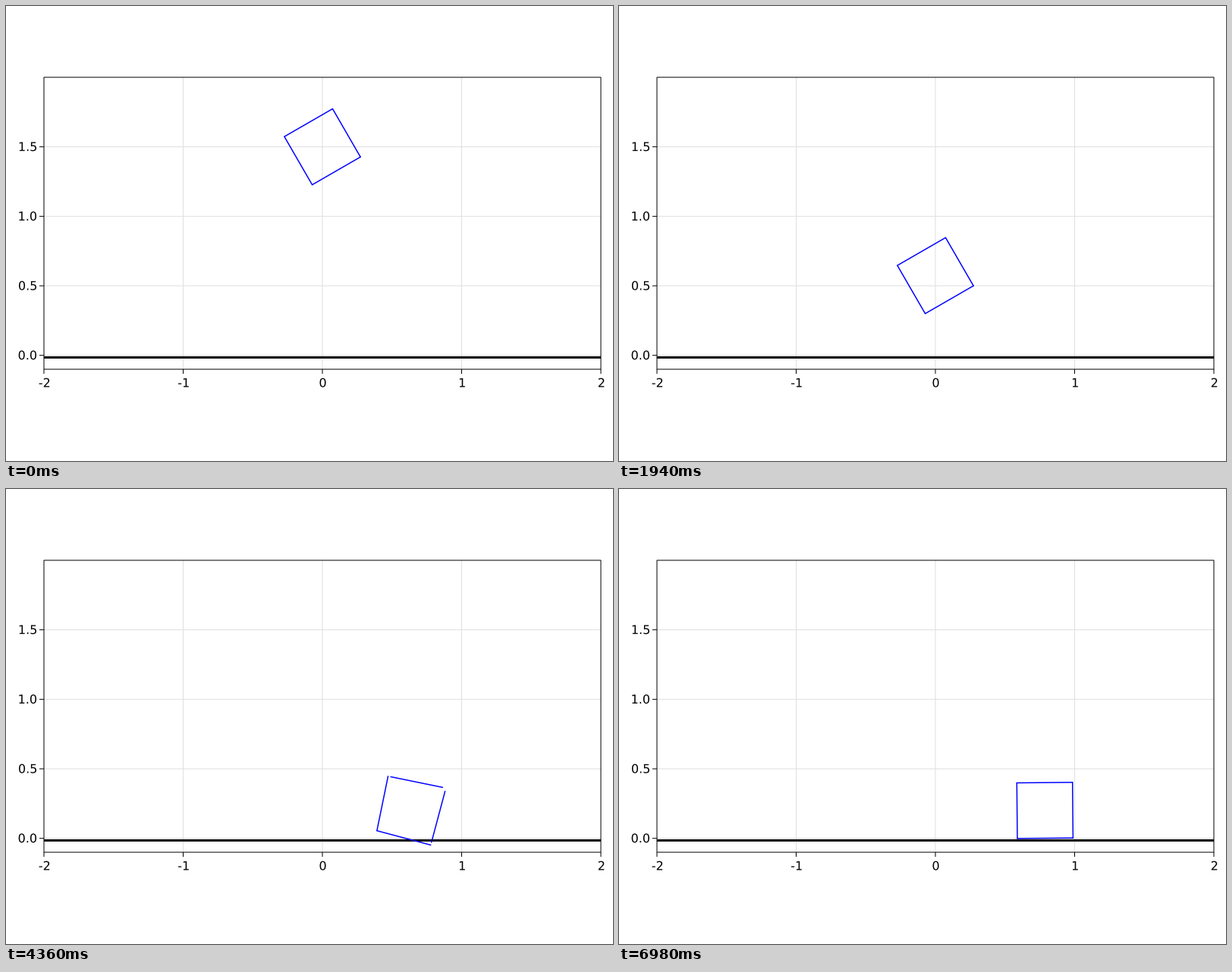
Write a matplotlib script that moves like this. It is 800 px wide and 600 px high and loops after 7080 ms.

```python
import numpy as np
import matplotlib.pyplot as plt
from matplotlib.animation import FuncAnimation
from matplotlib.collections import LineCollection
from matplotlib.patches import PathPatch, Rectangle
from matplotlib.textpath import TextPath
from matplotlib.transforms import Affine2D

W, H, DPI = 800, 600, 100
TICK, LOOP, STEPS = 20, 7080, 150
X0, X1, Y0, Y1 = 50, 784, 94, 479   # axis frame in pixels
G = 9.81e-4                         # gravity in m per step squared
SIDE = 0.4
HIT1, HIT2, LAND, TIP = 48, 94, 104, 108
BOUNCE = 0.45
CORNERS = SIDE / np.sqrt(2) * np.exp(1j * np.radians([135, 45, -45, -135]))

plt.rcParams["path.snap"] = False


def px(x, y):
    return X0 + (X1 - X0) * (x + 2) / 4, Y1 - (Y1 - Y0) * (y + 0.1) / 2.1


def pt(pixels):
    return pixels * 72 / DPI


def tipping():
    """Tilt of the box as it rocks down onto its base, one value per step."""
    tilt, speed, sub = 18.9, 0.0, 50
    out = []
    for _ in range(TIP, STEPS):
        out.append(tilt)
        for _ in range(sub):
            speed -= 0.149 * np.cos(np.radians(45 + tilt)) / sub
            tilt += speed / sub
            if tilt < 0:
                tilt, speed = 0.0, -BOUNCE * speed
    return out


TILT = tipping()


def pose(n):
    """Centre (complex), angle and joint opening in degrees at step n."""
    if n <= HIT1:
        return 1j * (1.5 - 0.002 * n - G * n * (n + 1) / 2), 30, 0
    if n <= HIT2:
        k = n - 61
        centre = 0.1766 + 0.0138 * k + 1j * (0.4376 + 0.0091 * k - G * k * k / 2)
        return centre, 30 - 2.925 * (n - 48.45), 3.35
    if n < LAND:
        k = n - HIT2
        centre = 0.632 + 0.0056 * k + 1j * (0.2038 + 0.0105 * k - G * k * k / 2)
        return centre, -103.2 + 3.2 * k, 0
    angle = TILT[max(n - TIP, 0)] - 90
    foot_x = np.interp(n, [LAND, 128, 149], [0.5635, 0.587, 0.5885])
    foot_y = np.interp(n, [LAND, 107, 149], [0.006, 0.004, -0.001])
    return foot_x + 1j * foot_y - CORNERS[2] * np.exp(1j * np.radians(angle)), angle, 0


def edges(n):
    centre, angle, gap = pose(n)
    p = centre + CORNERS * np.exp(1j * np.radians(angle))
    hinge = p[2]
    swing = np.exp(1j * np.radians(gap / 2))
    right = hinge + (p - hinge) / swing
    left = hinge + (p - hinge) * swing
    keep = 0.95 if gap else 1
    segs = [
        (right[0], right[0] + keep * (right[1] - right[0])),
        (right[1], right[2]),
        (left[2], left[3]),
        (left[0] + keep * (left[3] - left[0]), left[0]),
    ]
    return [[px(z.real, z.imag) for z in s] for s in segs]


def step_at(tick):
    """Steps last 20, 100 and 20 ms in turn."""
    cycle, rest = divmod(tick * TICK, 140)
    return min(3 * cycle + (rest >= 20) + (rest >= 120), STEPS - 1)


fig = plt.figure(figsize=(W / DPI, H / DPI), dpi=DPI, facecolor="white")
ax = fig.add_axes([0, 0, 1, 1])
ax.set(xlim=(0, W), ylim=(H, 0))
ax.axis("off")


def line(xs, ys, color="black", width=1, z=2):
    ax.plot(xs, ys, color=color, lw=pt(width), zorder=z, solid_capstyle="butt")


def label(x, y, text, align):
    """Unhinted text; align is the share of its width left of x."""
    path = TextPath((0, 0), text, size=16, prop={"family": "DejaVu Sans"})
    shift = align * path.get_extents().x1
    place = Affine2D().scale(1, -1).translate(x - shift, y)
    ax.add_patch(PathPatch(path.transformed(place), fc="black", lw=0))


for v in range(-2, 3):
    x = px(v, 0)[0]
    if abs(v) < 2:
        line([x, x], [Y0, Y1], "#dfdfdf", z=1)
    line([x, x], [Y1, Y1 + 6])
    label(x, 502.5, str(v), 0.5)

for v in (0.0, 0.5, 1.0, 1.5):
    y = px(0, v)[1]
    line([X0, X1], [y, y], "#dfdfdf", z=1)
    line([X0 - 6, X0], [y, y])
    label(X0 - 10, y + 5.5, f"{v:.1f}", 1)

ax.add_patch(Rectangle((X0, Y0), X1 - X0, Y1 - Y0, fill=False, ec="black",
                       lw=pt(1), zorder=3))
ground = px(0, -0.015)[1]
line([X0, X1], [ground, ground], width=3, z=4)

box = LineCollection(edges(0), colors="#0000ff", linewidths=pt(1.5),
                     capstyle="round", zorder=5)
ax.add_collection(box, autolim=False)


def update(tick):
    box.set_segments(edges(step_at(tick)))
    return [box]


anim = FuncAnimation(fig, update, frames=LOOP // TICK, interval=TICK,
                     repeat=True, repeat_delay=0)
plt.show()
```
